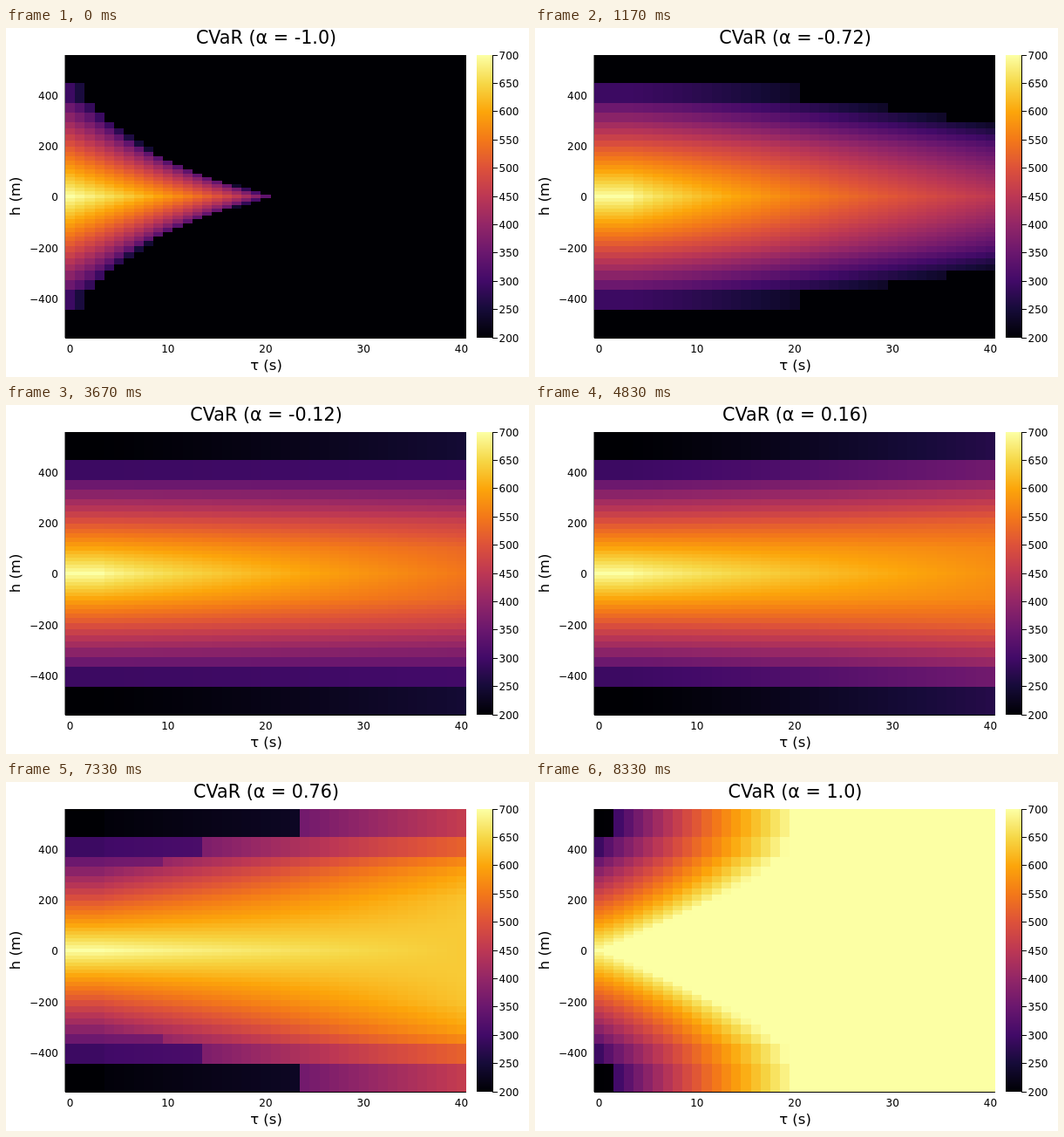
Recreate the animation shown at these times as an HTML page with a canvas. Size 600 by 400 pixels, loop 8.49 s.

```html
<!DOCTYPE html>
<html>
<head>
<meta charset="utf-8">
<style>
html, body { margin: 0; width: 100%; height: 100%; overflow: hidden; background: #fff; }
canvas { display: block; }
</style>
</head>
<body>
<canvas id="stage" width="600" height="400"></canvas>
<script>
const ctx = document.getElementById('stage').getContext('2d');
const LOOP = 8490, STEP = 500 / 3, COLS = 41;
const LEFT = 68, TOP = 31, WIDTH = 460, HEIGHT = 324, MID = 193;
const METRES = 3.43; // per pixel

const INFERNO = ['000004', '160b39', '420a68', '6a176e', '932667', 'bc3754',
  'dd513a', 'f37819', 'fca50a', 'f6d746', 'fcffa4']
  .map(c => [0, 2, 4].map(i => parseInt(c.slice(i, i + 2), 16)));

// Row borders, in pixels away from the middle
const BORDERS = [2, 6, 10, 14, 18, 22, 26, 31, 36, 41, 46, 51, 57, 64, 71, 78, 85, 96, 107, 130, 162];

// Values at the right edge (tau = 40), by alpha and height
const ALPHAS = [-0.88, -0.56, -0.12, 0.4, 0.76];
const HEIGHTS = [0, 100, 200, 300, 350, 400, 500];
const FINAL = [
  [420, 355, 285, 145, 70, 30, 0],
  [488, 440, 365, 285, 268, 245, 200],
  [550, 530, 470, 385, 350, 305, 245],
  [605, 597, 568, 490, 450, 415, 285],
  [637, 637, 630, 600, 567, 525, 460]
];

const lerp = (a, b, t) => a + (b - a) * t;
const clamp = (x, lo, hi) => Math.min(hi, Math.max(lo, x));

function interp(xs, ys, x) {
  let i = 0;
  while (i < xs.length - 2 && x > xs[i + 1]) i++;
  return lerp(ys[i], ys[i + 1], clamp((x - xs[i]) / (xs[i + 1] - xs[i]), 0, 1));
}

function colour(value) {
  const p = clamp((value - 200) / 50, 0, 10), i = Math.min(9, Math.floor(p));
  return `rgb(${INFERNO[i].map((c, j) => Math.round(lerp(c, INFERNO[i + 1][j], p - i)))})`;
}

function worstCase(h, tau) {
  const s = 1 - h / 500;
  const end = Math.max(1e-9, 20.8 * s ** (1.45 + 0.95 * s));
  return 200 + 500 * s * Math.max(0, 1 - tau / end) ** 0.4;
}

function bestCase(h, tau) {
  const end = Math.max(1e-9, 20 * Math.sin(Math.PI * h / 1000));
  return 700 - h * (1 - Math.min(1, tau / end) ** lerp(1.4, 0.7, h / 500));
}

function average(h, tau, alpha) {
  const final = interp(ALPHAS, FINAL.map(row => interp(HEIGHTS, row, h)), alpha);
  const power = alpha > 0.5 ? 0.85 : 0.75 + 0.5 * Math.min(1, h / 200);
  return lerp(700 - h, final, Math.max(0, (tau - 3) / 37) ** power);
}

function valueAt(h, tau, alpha) {
  let v = average(h, tau, alpha);
  if (alpha < -0.88) v = lerp(worstCase(h, tau), v, Math.sqrt((alpha + 1) / 0.12));
  if (alpha > 0.76) v = lerp(v, bestCase(h, tau), ((alpha - 0.76) / 0.24) ** 2);
  if (alpha < -0.7 && v < 230) v = 200;
  // Outer rows stay low, then jump
  if (alpha > 0.5 && h > 330) {
    const jump = interp([348, 406, 500], [9.5, 13.5, 23.5], h) - 92 * (alpha - 0.76);
    if (tau < jump) v = Math.min(v, 700 - h + 1.3 * tau);
  }
  return v;
}

function text(str, x, y, size = 12, align = 'center') {
  ctx.font = `${size}px "DejaVu Sans", sans-serif`;
  ctx.textAlign = align;
  ctx.fillText(str, x, y);
}

function drawMap(alpha) {
  const edge = i => Math.round(LEFT + i * WIDTH / COLS);
  BORDERS.forEach((outer, i) => {
    const inner = i ? BORDERS[i - 1] : -outer;
    const h = Math.min(500, (inner + outer) / 2 * METRES);
    for (let tau = 0; tau < COLS; tau++) {
      const x = edge(tau), w = edge(tau + 1) - x;
      ctx.fillStyle = colour(valueAt(h, tau, alpha));
      ctx.fillRect(x, MID - outer, w, outer - inner);
      ctx.fillRect(x, MID + inner, w, outer - inner);
    }
  });
}

function drawAxes() {
  ctx.fillStyle = '#000';
  ctx.fillRect(LEFT - 0.5, TOP, 0.5, HEIGHT);
  ctx.fillRect(LEFT, TOP + HEIGHT, WIDTH, 1);
  for (let tau = 0; tau <= 40; tau += 10) text(tau, 73.6 + tau * WIDTH / COLS, 372);
  for (let h = -400; h <= 400; h += 200) {
    text(String(h).replace('-', '\u2212'), 60, 198.4 - h * 0.2917, 12, 'right');
  }
  text('τ (s)', 298.5, 392, 16.5);
  ctx.save();
  ctx.translate(16, MID);
  ctx.rotate(-Math.PI / 2);
  text('h (m)', 0, 0, 16.5);
  ctx.restore();
}

function drawBar() {
  for (let y = 0; y < HEIGHT; y++) {
    ctx.fillStyle = colour(700 - 500 * y / (HEIGHT - 1));
    ctx.fillRect(540, TOP + y, 18, 1);
  }
  ctx.fillStyle = '#000';
  ctx.fillRect(558, TOP, 1, HEIGHT);
  for (let v = 200; v <= 700; v += 50) {
    const y = TOP + (700 - v) / 500 * HEIGHT;
    ctx.fillRect(558, Math.floor(y), 6, 1);
    text(v, 565.5, y + 4.5, 12, 'left');
  }
}

function draw(step) {
  const alpha = (step * 4 - 100) / 100;
  ctx.fillStyle = '#fff';
  ctx.fillRect(0, 0, 600, 400);
  drawMap(alpha);
  drawAxes();
  drawBar();
  const label = Number.isInteger(alpha) ? alpha.toFixed(1) : alpha;
  text(`CVaR (α = ${label})`, 298.5, 18, 20.7);
}

let shown = -1;
function tick() {
  const step = Math.min(50, Math.floor((performance.now() % LOOP + 4) / STEP));
  if (step !== shown) draw(shown = step);
  requestAnimationFrame(tick);
}
tick();
</script>
</body>
</html>
```
